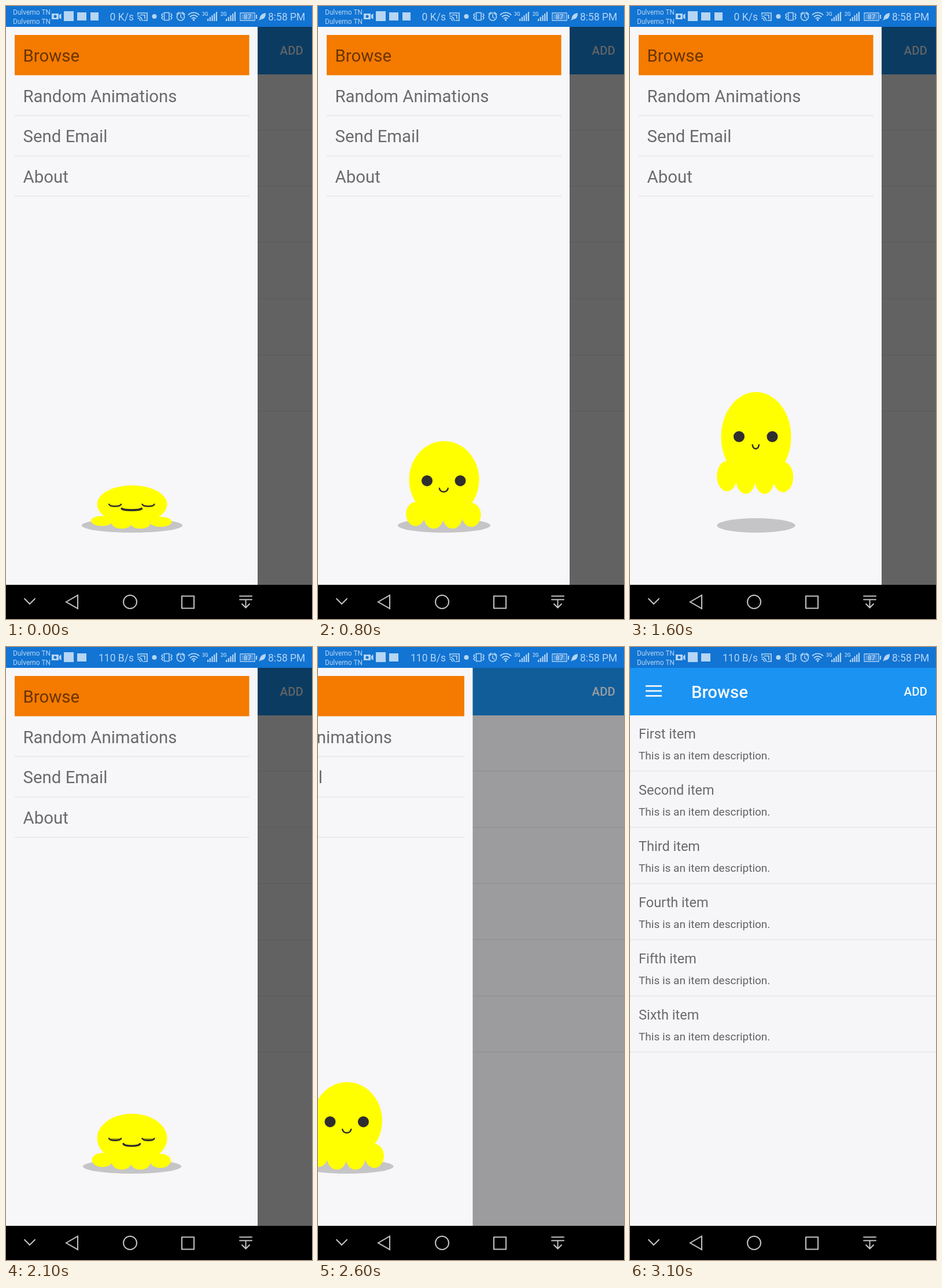
Write an HTML page with a canvas that moves like this. It is 529 px wide and 1058 px high and loops after 3.2 s.

```html
<!DOCTYPE html>
<html lang="en">
<head>
<meta charset="utf-8">
<title>Drawer</title>
<style>
html, body { margin: 0; width: 100%; height: 100%; overflow: hidden; background: #f6f5f8; }
canvas { display: block; }
</style>
</head>
<body>
<canvas id="stage" width="529" height="1058"></canvas>
<script>
const ctx = document.getElementById('stage').getContext('2d');
const LOOP = 3200, STEP = 100, BOUNCE = 1100;
const PAUSES = [900, 1300, 2400];
const TOP = 36, BOTTOM = 999, DRAWER = 435;
const PAPER = '#f7f6f9', INK = 'rgba(0,0,0,.57)', LINE = '#e7e6e9', DARK = '#2f2d2f', PALE = '#b5d5f3';

const clamp = v => Math.max(0, Math.min(1, v));

function rect(x, y, w, h, color) {
  ctx.fillStyle = color;
  ctx.fillRect(x, y, w, h);
}

function text(str, x, y, size, color, weight = 400, align = 'left') {
  ctx.font = `${weight} ${size}px Roboto, sans-serif`;
  ctx.textAlign = align;
  ctx.fillStyle = color;
  ctx.fillText(str, x, y);
}

function ellipse(x, y, rx, ry, color) {
  ctx.fillStyle = color;
  ctx.beginPath();
  ctx.ellipse(x, y, rx, ry, 0, 0, 7);
  ctx.fill();
}

function stroke(path, color, width = 2) {
  ctx.strokeStyle = color;
  ctx.lineWidth = width;
  ctx.stroke(new Path2D(path));
}

function fillPath(path, color) {
  ctx.fillStyle = color;
  ctx.fill(new Path2D(path));
}

function ring(x, y, r, color, width) {
  stroke(`M${x - r} ${y}a${r} ${r} 0 1 1 ${2 * r} 0a${r} ${r} 0 1 1 ${-2 * r} 0z`, color, width);
}

function signal(x, label) {
  text(label, x, 17, 8.5, PALE, 500);
  for (let i = 0; i < 5; i++) rect(x + 9 + i * 3.7, 22 - i * 3, 2.2, 4 + i * 3, PALE);
}

function statusBar(t) {
  rect(0, 0, 529, TOP, '#1274d3');
  for (const y of [14.5, 30.5]) text('Dulvemo TN', 12, y, 11.9, PALE);
  fillPath('M79 13h12v10h-12zM92 15.5l3.5-2.5v10l-3.5-2.5z', PALE);
  ellipse(85, 18, 2.5, 2.5, '#1274d3');
  rect(100, 9, 17, 17, PALE);
  rect(123, 11, 16, 14, PALE);
  if (t < 1800) rect(146, 11, 14, 14, PALE);
  text(t < 2000 ? '0 K/s' : '110 B/s', 221, 24.5, 17.5, PALE, 400, 'right');

  stroke('M228 15v-3h16v13h-6M228 17.5a8 8 0 0 1 7.5 7.5M228 21a4 4 0 0 1 4 4M232 15.5h8v6', PALE, 1.7);
  ellipse(256.5, 18, 4, 4, PALE);
  stroke('M273.5 11.5h8.5v13h-8.5zM271 13l-2 2.5 2 2.5-2 2.5 2 2.5M285 13l2 2.5-2 2.5 2 2.5-2 2.5', PALE, 1.6);
  ring(302, 18.5, 6.5, PALE, 1.7);
  stroke('M302 14.5v4.5l3 2M295 14l4-3.5M309 14l-4-3.5', PALE, 1.5);
  stroke('M315.5 15a13 13 0 0 1 18 0M318.5 18.5a8.5 8.5 0 0 1 12 0M321.5 21.5a4.5 4.5 0 0 1 6 0', PALE, 1.9);
  ellipse(324.5, 24, 1.7, 1.7, PALE);
  signal(339, '3G');
  signal(371, '2G');
  stroke('M405 12h25v13h-25z', PALE, 1.3);
  rect(432, 15, 2, 7, PALE);
  rect(407, 14, 21, 9, 'rgba(181,213,243,.3)');
  text('87', 417.5, 23, 12, PALE, 500, 'center');
  fillPath('M437 25q2-3 2-6q2-6 10-7q0 11-8 11z', PALE);
  text('8:58 PM', 453, 24.5, 17.5, PALE);
}

function navBar() {
  rect(0, BOTTOM, 529, 59, '#000');
  stroke('M32 1023l9 9 9-9M104 1028.5l20-11.5v23zM304 1018.5h21v21h-21z', '#c4c4c4');
  ring(214.5, 1028.5, 11.5, '#c4c4c4');
  stroke('M404 1018.5h21M404 1024.5h21M414.5 1024.5v14M408 1032l6.5 6.5 6.5-6.5', '#c4c4c4');
}

function itemPage() {
  rect(0, TOP, 529, BOTTOM - TOP, '#f6f5f8');
  rect(0, TOP, 529, 82, '#1b93f3');
  for (const y of [66, 74.5, 83]) rect(27, y, 28, 2.7, '#f4f8fc');
  text('Browse', 106, 88, 29.4, '#f4f8fc', 500);
  text('ADD', 514, 84, 20.5, '#f4f8fc', 500, 'right');
  ['First', 'Second', 'Third', 'Fourth', 'Fifth', 'Sixth'].forEach((name, i) => {
    const y = 117 + i * 97;
    text(name + ' item', 15, y + 40.5, 23.5, INK);
    text('This is an item description.', 15, y + 77, 19, 'rgba(0,0,0,.6)');
    rect(0, y + 96.5, 529, 1.5, LINE);
  });
}

// A cup-shaped curve, used for the mouth and for closed eyes
function cup(x, y, half, depth) {
  const c = depth * 4 / 3;
  return `M${x - half} ${y}C${x - half * .8} ${y + c} ${x + half * .8} ${y + c} ${x + half} ${y}`;
}

function octopus(t) {
  // Time distance from the deepest squash: 0 to 350 on the ground, 350 to 550 in the air
  const d = Math.abs((t - 50 + BOUNCE / 2) % BOUNCE - BOUNCE / 2);
  const air = d > 350 ? 1 - ((550 - d) / 200) ** 2 : 0;
  const height = 67.5 + 83.5 * Math.min(1, d / 350) ** 1.25 + 33 * air;
  const squash = clamp((151 - height) / 76);
  const foot = 902 - 80 * air, top = foot - height;

  ellipse(218, 896.5, 80 + 7 * squash - 16.5 * air, 12.5, '#c5c4c6');

  const yellow = '#ffff00', legX = 16.5 + 2.5 * squash + 1.5 * air, legY = .157 * height - 3 + 2 * air;
  ellipse(218, top + .44 * height, 60.5, .44 * height, yellow);
  ellipse(152 - 5 * squash - 2.5 * air + legX, foot - 4.5 - legY, legX, legY, yellow);
  ellipse(281.5 + 5 * squash + air - legX, foot - 3 - legY, legX, legY, yellow);
  for (const x of [200, 232.5]) ellipse(x, foot - legY, 17, legY, yellow);

  const eyeY = top + .453 * height - 3.5 * air;
  for (const x of [188.5, 246]) {
    if (squash < .5) {
      ellipse(x, eyeY, 9.5, 9.5, DARK);
    } else {
      const lid = cup(x, eyeY - 1, 10.5, 3.5);
      fillPath(lid, `rgba(60,60,20,${2 * (1 - squash)})`);
      stroke(lid, DARK, 2.5);
    }
  }
  stroke(cup(217.3, top + .54 * height - 5 * air, 7.5 + 9.5 * squash - 2.5 * air, 6 - 3.5 * squash + air),
    DARK, 2.5 + 1.3 * squash);
}

function drawer(t) {
  rect(0, TOP, DRAWER, BOTTOM - TOP, PAPER);
  rect(15, 50, 405.5, 69.5, '#f47a00');
  ['Browse', 'Random Animations', 'Send Email', 'About'].forEach((name, i) => {
    const y = 50 + i * 69.6;
    text(name, 29.5, y + 46, 29.4, INK);
    if (i) rect(15, y + 68.7, 405.5, 1.5, LINE);
  });
  octopus(t);
}

function draw(t) {
  const u = clamp((t - 2441) / 376), closed = u * u * (3 - 2 * u);
  itemPage();
  rect(0, TOP, 529, BOTTOM - TOP, `rgba(0,0,0,${.6 * (1 - closed)})`);
  if (closed < 1) {
    ctx.save();
    ctx.translate(-DRAWER * closed, 0);
    drawer(t);
    ctx.restore();
  }
  statusBar(t);
  navBar();
}

function tick() {
  let t = Math.floor(performance.now() % LOOP / STEP) * STEP;
  if (PAUSES.includes(t)) t -= STEP;
  draw(t);
  requestAnimationFrame(tick);
}

ctx.lineCap = 'round';
tick();
</script>
</body>
</html>
```
